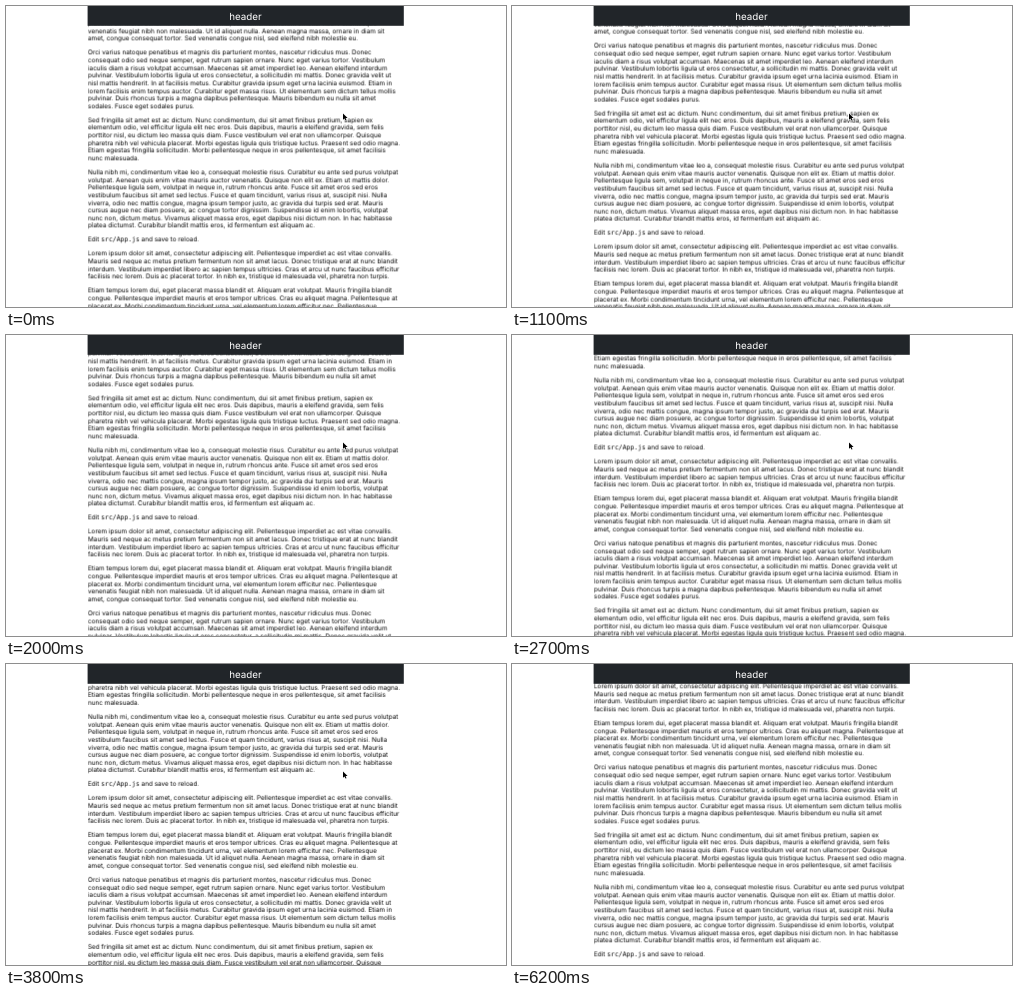
These frames come from a looping animation (500x301 px, 7000 ms). An HTML page:

```html
<!DOCTYPE html>
<html lang="en">
<head>
<meta charset="utf-8">
<title>Fixed header</title>
<style>
  html, body { margin: 0; width: 100%; height: 100%; overflow: hidden; background: #fff; }
  #stage { position: relative; width: 500px; height: 301px; overflow: hidden;
    font: 6.42px/1.1875 Inter, sans-serif; color: #000; text-rendering: geometricPrecision; }
  #text { position: absolute; left: 0; top: 0; white-space: pre; will-change: transform; }
  p { margin: 0 0 1em; }
  code { font: 1em/1 "DejaVu Sans Mono", monospace; }
  svg { position: absolute; left: 0; top: 0; overflow: visible; }
  svg text { font-size: 9.8px; fill: #fff; text-anchor: middle; }
</style>
</head>
<body>
<div id="stage">
  <div id="text"><div id="copy"><p>Lorem ipsum dolor sit amet, consectetur adipiscing elit. Pellentesque imperdiet ac est vitae convallis.
Mauris sed neque ac metus pretium fermentum non sit amet lacus. Donec tristique erat at nunc blandit
interdum. Vestibulum imperdiet libero ac sapien tempus ultricies. Cras et arcu ut nunc faucibus efficitur
facilisis nec lorem. Duis ac placerat tortor. In nibh ex, tristique id malesuada vel, pharetra non turpis.</p><p>Etiam tempus lorem dui, eget placerat massa blandit et. Aliquam erat volutpat. Mauris fringilla blandit
congue. Pellentesque imperdiet mauris et eros tempor ultrices. Cras eu aliquet magna. Pellentesque at
placerat ex. Morbi condimentum tincidunt urna, vel elementum lorem efficitur nec. Pellentesque
venenatis feugiat nibh non malesuada. Ut id aliquet nulla. Aenean magna massa, ornare in diam sit
amet, congue consequat tortor. Sed venenatis congue nisl, sed eleifend nibh molestie eu.</p><p>Orci varius natoque penatibus et magnis dis parturient montes, nascetur ridiculus mus. Donec
consequat odio sed neque semper, eget rutrum sapien ornare. Nunc eget varius tortor. Vestibulum
iaculis diam a risus volutpat accumsan. Maecenas sit amet imperdiet leo. Aenean eleifend interdum
pulvinar. Vestibulum lobortis ligula ut eros consectetur, a sollicitudin mi mattis. Donec gravida velit ut
nisl mattis hendrerit. In at facilisis metus. Curabitur gravida ipsum eget urna lacinia euismod. Etiam in
lorem facilisis enim tempus auctor. Curabitur eget massa risus. Ut elementum sem dictum tellus mollis
pulvinar. Duis rhoncus turpis a magna dapibus pellentesque. Mauris bibendum eu nulla sit amet
sodales. Fusce eget sodales purus.</p><p>Sed fringilla sit amet est ac dictum. Nunc condimentum, dui sit amet finibus pretium, sapien ex
elementum odio, vel efficitur ligula elit nec eros. Duis dapibus, mauris a eleifend gravida, sem felis
porttitor nisl, eu dictum leo massa quis diam. Fusce vestibulum vel erat non ullamcorper. Quisque
pharetra nibh vel vehicula placerat. Morbi egestas ligula quis tristique luctus. Praesent sed odio magna.
Etiam egestas fringilla sollicitudin. Morbi pellentesque neque in eros pellentesque, sit amet facilisis
nunc malesuada.</p><p>Nulla nibh mi, condimentum vitae leo a, consequat molestie risus. Curabitur eu ante sed purus volutpat
volutpat. Aenean quis enim vitae mauris auctor venenatis. Quisque non elit ex. Etiam ut mattis dolor.
Pellentesque ligula sem, volutpat in neque in, rutrum rhoncus ante. Fusce sit amet eros sed eros
vestibulum faucibus sit amet sed lectus. Fusce et quam tincidunt, varius risus at, suscipit nisi. Nulla
viverra, odio nec mattis congue, magna ipsum tempor justo, ac gravida dui turpis sed erat. Mauris
cursus augue nec diam posuere, ac congue tortor dignissim. Suspendisse id enim lobortis, volutpat
nunc non, dictum metus. Vivamus aliquet massa eros, eget dapibus nisi dictum non. In hac habitasse
platea dictumst. Curabitur blandit mattis eros, id fermentum est aliquam ac.</p><p>Edit <code>src/App.js</code> and save to reload.</p></div></div>
  <svg width="500" height="301">
    <rect x="81.6" width="316.2" height="19.8" fill="#212529"/>
    <text x="239.5" y="14">header</text>
    <g id="cursor">
      <path id="arrow" d="M0 0V6.4L1.5 5 2.5 7.2 3.5 6.8 2.6 4.7H4.6Z" stroke="#fff" stroke-width=".8" paint-order="stroke"/>
      <path id="beam" d="M-1 0H1M0 0V6.5M-1 6.5H1" stroke="#000" stroke-width=".5"/>
    </g>
  </svg>
</div>
<script>
const LOOP = 7000, STEP = 100, LEFT = 81.7;
const EM = 6.42, LINE = 1.1875 * EM, PERIOD = 44 * EM; // 32 lines and 6 gaps
const $ = id => document.getElementById(id);
const text = $("text"), cursor = $("cursor"), arrow = $("arrow"), beam = $("beam");
text.append($("copy").cloneNode(true));
text.lastChild.removeAttribute("id");

const progress = (t, from, to) => Math.min(1, Math.max(0, (t - from) / (to - from)));

// Trackpad flick: a push of the given sharpness, then momentum running out
const flick = (t, from, to, sharpness) =>
  1 - (1 - progress(t, from, to) ** sharpness) ** 3;

const scrolled = t =>
  332.5 * flick(t, 200, 1600, 1.6) +
  progress(t, 1700, 2000) +
  332 * flick(t, 2300, 3400, 2.55) +
  125 * flick(t, 3700, 4500, 1.6);

const path = [[4700, 337, 107.4], [4800, 331, 104.4], [5100, 326, 100], [5200, 326, 100], [5900, 163, 78]];

function pointer(t) {
  let [, x, y] = path[0];
  for (let i = 1; i < path.length; i++) {
    const k = progress(t, path[i - 1][0], path[i][0]);
    x += (path[i][1] - path[i - 1][1]) * k;
    y += (path[i][2] - path[i - 1][2]) * k;
  }
  return [x, y];
}

function draw(now) {
  const t = Math.floor(now % LOOP / STEP) * STEP;
  // Centre of the "Edit" line, wrapped to one period of text
  const edit = ((234.6 - scrolled(t) - 9.5) % PERIOD + PERIOD) % PERIOD + 9.5;
  text.style.transform = `translate(${LEFT}px, ${edit - PERIOD + EM + LINE / 2}px)`;

  const [x, y] = pointer(t);
  cursor.setAttribute("transform", `translate(${x} ${y})`);
  arrow.style.display = t < 5300 ? "" : "none";
  beam.style.display = t >= 5300 && t < 6200 ? "" : "none";
  requestAnimationFrame(draw);
}
requestAnimationFrame(draw);
</script>
</body>
</html>
```
